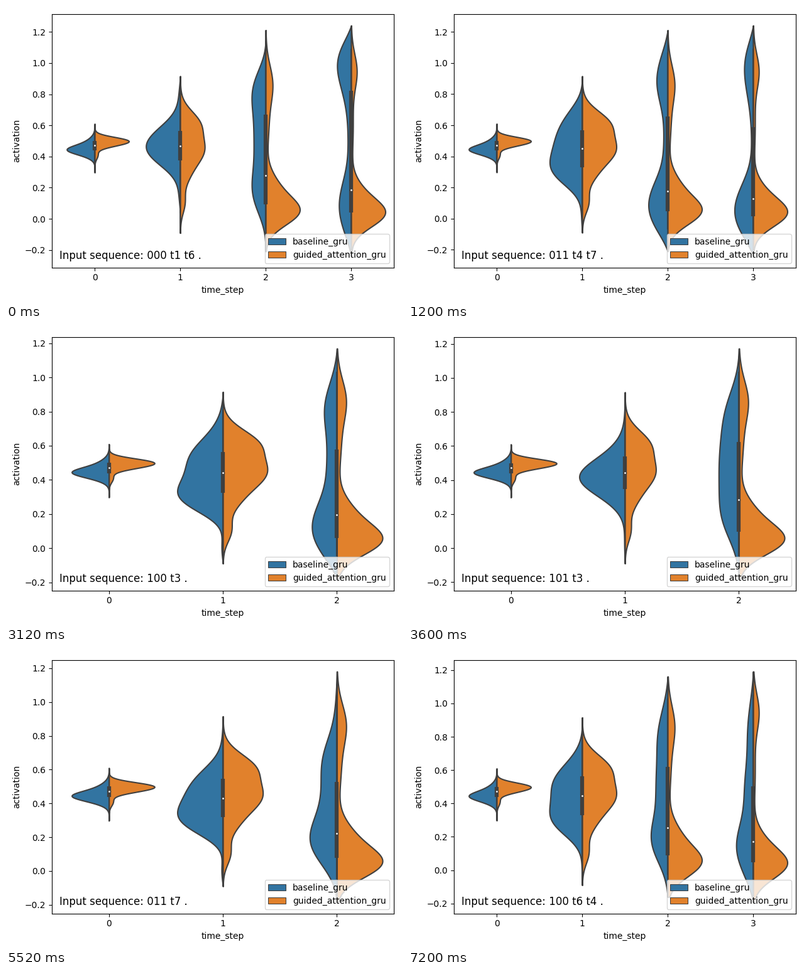
Animation of 630x470 px, one loop 8 s. Source, as a matplotlib script:

```python
import numpy as np
import matplotlib.pyplot as plt
from matplotlib.animation import FuncAnimation
from matplotlib.patches import Rectangle

W, H, DPI = 630, 470, 100
BLUE, ORANGE, GRAY = "#3274a1", "#e1812c", "#3f3f3f"
STEP_MS, STEPS_PER_SCENE, STEPS = 400, 3, 20
MAX_WIDTH = .4
Y = np.linspace(-.3, 1.3, 1601)

plt.rcParams["font.family"] = "DejaVu Sans"


def bells(modes):
    """Sum of (centre, weight, spread) bell curves."""
    return sum(a * np.exp(-((Y - c) / s) ** 2 / 2) for c, a, s in modes)


def through(widths, lo, hi):
    """Smooth curve through evenly spaced widths, zero at both ends."""
    keys = np.linspace(lo, hi, len(widths) + 2)
    spread = .8 * (keys[1] - keys[0])

    def kernel(y):
        return np.exp(-((y[:, None] - keys) / spread) ** 2 / 2)

    weights = np.linalg.solve(kernel(keys), [0, *widths, 0])
    return np.maximum(kernel(Y) @ weights, 0)


# Shapes that every input sequence shares
FIRST_SPAN, SECOND_SPAN = (.298, .61), (-.09, .915)
FIRST_LEFT = bells([(.445, 30, .026), (.475, 18, .038), (.415, 13, .028)])
RIGHT = [
    bells([(.505, 45, .023), (.475, 22, .022), (.41, 5, .025)]),
    bells([(.615, 37, .083), (.44, 46, .09), (.28, 14, .08), (.1, 9, .065)]),
    bells([(.04, 62, .086), (.18, 28, .105), (.87, 14, .12), (.6, 6, .15)]),
    bells([(.027, 48, .085), (.15, 18, .095), (.95, 9, .11), (.6, 3, .18)]),
]

# Text, full data range, and the baseline's widths from the second step on
SCENES = [
    ("000 t1 t6", (-.238, 1.24),
     [(0, 3, 17, 51, 47, 15, 3),
      (6.5, 22.5, 22.5, 21, 23, 22, 5),
      (15, 20.5, 10, 6, 9, 20, 21.5)]),
    ("011 t4 t7", (-.2405, 1.241),
     [(2, 15, 48, 53, 44, 27, 6),
      (27, 34, 15, 8, 11, 20.5, 13.5),
      (26, 29.5, 10, 3.5, 6.5, 14, 13)]),
    ("100 t3", (-.1805, 1.169),
     [(2, 18, 69, 67, 55.5, 28, 6),
      (31, 44, 27, 19, 20, 22.5, 10)]),
    ("101 t3", (-.181, 1.172),
     [(1, 5, 36, 72, 42, 9, 1),
      (11, 33, 40, 40, 36, 26, 8)]),
    ("011 t7", (-.183, 1.18),
     [(2, 16, 66, 68, 48, 16, 2),
      (20, 54, 45, 33.5, 30, 13, 3)]),
    ("010 t8", (-.181, 1.172),
     [(1, 9, 51, 70, 37, 8, 2),
      (14, 44, 45, 37, 34, 22, 6)]),
    ("100 t6 t4", (-.191, 1.191),
     [(1, 15, 48, 52, 47, 22, 3),
      (12, 30.5, 26, 22.5, 21, 18.5, 8),
      (19, 32, 22, 17, 13, 11, 5.5)]),
]

fig = plt.figure(figsize=(W / DPI, H / DPI), dpi=DPI, facecolor="white")
ax = fig.add_axes([73.1 / W, (H - 416.6) / H, 544 / W, 403.7 / H])


def draw_violin(x, lo, hi, left, right):
    # Both halves have equal area; the wider one sets the scale.
    inside = (Y >= lo) & (Y <= hi)
    y = Y[inside]
    left, right = (d[inside] / d[inside].sum() for d in (left, right))
    scale = MAX_WIDTH / max(left.max(), right.max())
    for edge, color in ((x - left * scale, BLUE), (x + right * scale, ORANGE)):
        ax.fill_betweenx(y, x, edge, facecolor=color, edgecolor=GRAY,
                         linewidth=1.5)

    q1, median, q3 = np.interp([.25, .5, .75], np.cumsum(left + right) / 2, y)
    reach, margin = 1.5 * (q3 - q1), .1 * (hi - lo)
    whisker = max(lo + margin, q1 - reach), min(hi - margin, q3 + reach)
    for ends, width in ((whisker, 1.5), ((q1, q3), 4.5)):
        ax.plot([x, x], ends, color=GRAY, linewidth=width,
                solid_capstyle="butt")
    ax.scatter(x, median, s=9, color="white", edgecolor=GRAY,
               linewidth=1, zorder=3)


def draw(i):
    text, (lo, hi), widths = SCENES[i // STEPS_PER_SCENE]
    ax.clear()
    n = len(widths) + 1
    spans = [FIRST_SPAN, SECOND_SPAN, (lo + .03, hi - .03)][:n - 1] + [(lo, hi)]
    lefts = [FIRST_LEFT] + [through(w, *s) for w, s in zip(widths, spans[1:])]
    for x, (span, left) in enumerate(zip(spans, lefts)):
        draw_violin(x, *span, left, RIGHT[x])

    margin = .05 * (hi - lo)
    ax.set_xticks(range(n))
    ax.set_yticks(np.arange(-1, 7) / 5)
    ax.set_xlim(-.5, n - .5)
    ax.set_ylim(lo - margin, hi + margin)
    ax.set_xlabel("time_step")
    ax.set_ylabel("activation")
    ax.text(.022, .0335, f"Input sequence: {text} .", fontsize=12,
            transform=ax.transAxes)
    keys = [Rectangle((0, 0), 0, 0, facecolor=c, edgecolor=GRAY, linewidth=.75)
            for c in (BLUE, ORANGE)]
    ax.legend(keys, ["baseline_gru", "guided_attention_gru"],
              loc="lower right")
    return []


anim = FuncAnimation(fig, draw, frames=STEPS, interval=STEP_MS,
                     init_func=lambda: draw(0), repeat=True, repeat_delay=0)
plt.show()
```
